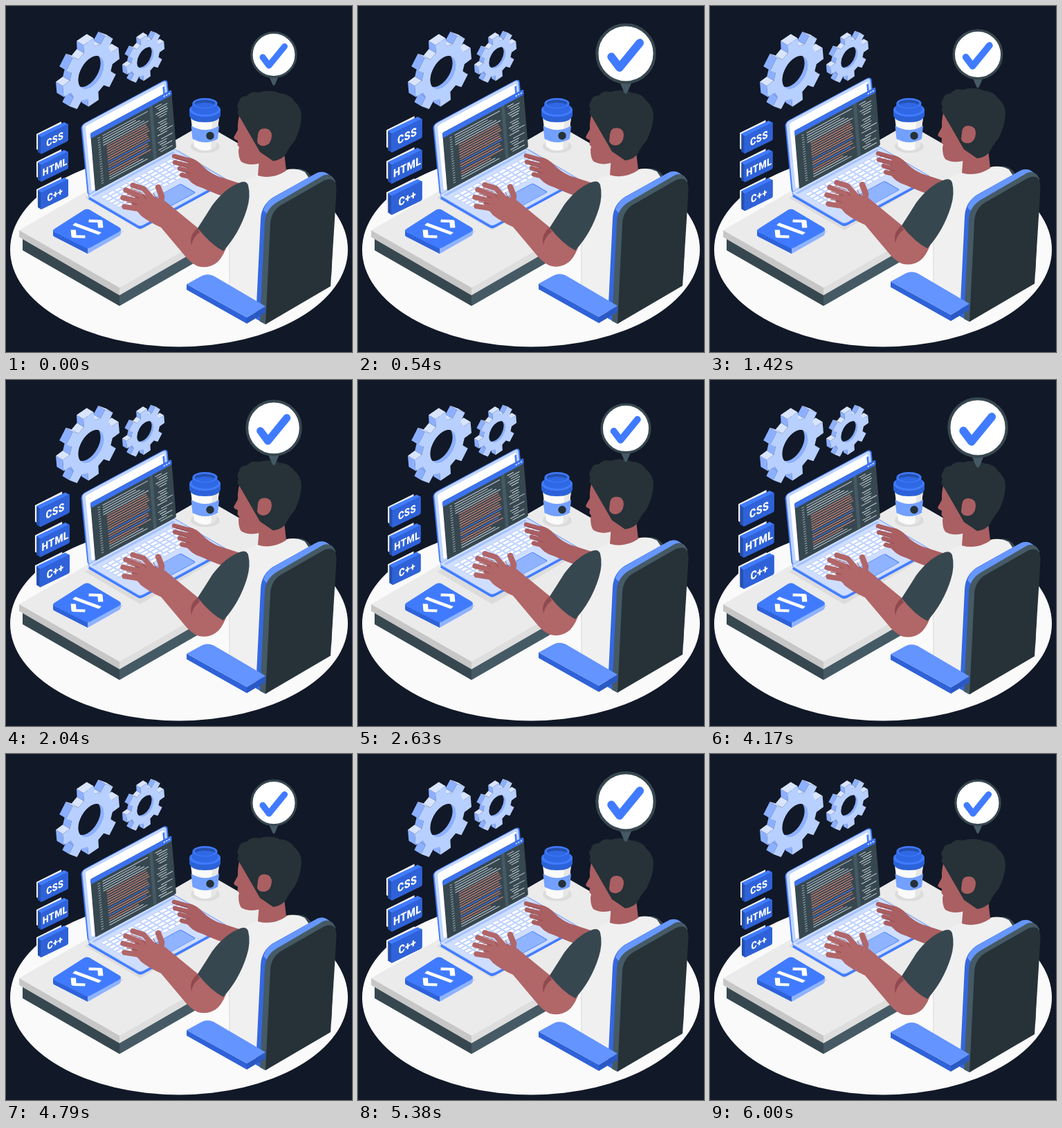
Recreate the animation shown at these times as an HTML page. Size 500 px wide and 500 px high, loop 6.04 s.

```html
<!DOCTYPE html>
<html lang="en">
<head>
<meta charset="utf-8">
<title>Developer at work</title>
<style>
html, body { margin: 0; width: 100%; height: 100%; overflow: hidden; background: #111827; }
svg { display: block; width: 100vw; height: 100vh; }
text { font: 800 14.5px Roboto, Inter, sans-serif; fill: #fff; text-anchor: middle; letter-spacing: .4px; }
</style>
</head>
<body>
<svg id="stage" viewBox="0 0 500 500" xmlns="http://www.w3.org/2000/svg">
  <ellipse cx="250" cy="352" rx="244" ry="140.500" fill="#fafafa"/>

  <g id="gears"></g>

  <g id="desk">
    <path d="M24 336 164 416V433.500L24 353Z" fill="#37474f"/>
    <path d="M164 416 284 347V364.500L164 433.500Z" fill="#455a64"/>
    <path d="M19 324 286 170 430 253 164 407Z" fill="#ebebeb"/>
    <path d="M19 324 164 407V418L19 334Z" fill="#c7c7c7"/>
    <path d="M164 407 430 253V264L164 418Z" fill="#dedede"/>
    <path d="M114 277 194 324 320 250 250 208Z" fill="#dcdcdc"/>
    <ellipse cx="288" cy="203" rx="21" ry="9.500" fill="#dcdcdc"/>
  </g>

  <g id="tile">
    <path d="M70 331 116 304 170 326 120 357Z" fill="#d9d9d9"/>
    <path d="M68 324V331Q68 333 71 334L118 358V349Z" fill="#2e62d9"/>
    <path d="M118 349V358L164 332Q166 330 166 328V322Z" fill="#8fb3ff"/>
    <path d="M70 322 113 294.500Q117 292.500 121 294.500L164 320Q168 323 164 326L122 349Q118 351 114 349L70 327Q66 324.500 70 322Z" fill="#407bff"/>
    <g transform="matrix(.86 -.5 .86 .5 117 322)" fill="none" stroke="#fff" stroke-width="6" stroke-linejoin="round">
      <path d="M-13-10-22 0-13 10M13-10 22 0 13 10M-4-18 4 18"/>
    </g>
  </g>

  <g id="cup">
    <path d="M267 160 272 203Q288 215 303 203L308 160Z" fill="#fafafa"/>
    <path d="M298 165 296 208 303 203 308 160Z" fill="#e6e6e6"/>
    <path d="M267.500 173Q288 185 308 173L306 192Q288 202 269.500 192Z" fill="#73a0ff"/>
    <circle cx="295" cy="187.500" r="5.700" fill="#263238"/>
    <path d="M265 150V158Q267 168 287.500 168 308 168 310 158V150Z" fill="#2c62d8"/>
    <ellipse cx="287.500" cy="150" rx="22.500" ry="10" fill="#407bff"/>
    <path d="M269.500 141 268 150Q274 157 287.500 157 302 157 307 150L305 141Z" fill="#2f68e5"/>
    <ellipse cx="287.500" cy="140.500" rx="18" ry="7.500" fill="#407bff"/>
    <ellipse cx="287.500" cy="141" rx="15" ry="5.500" fill="#2450ae"/>
    <path d="M273 142Q287 137 302 142 299 147 287 147 277 147 273 142Z" fill="#2f68e5"/>
  </g>

  <g id="worker">
    <g id="laptop"></g>

    <g id="farArm" fill="#aa5f62" stroke-linecap="round">
      <path d="M264 219Q275 221 284 231 294 241 306 246L340 257 326 279Q303 272 284 263 266 258 259 244Z"/>
      <path d="M243 217 268 224M244 226 264 231M251 235 265 239M254 244 270 248" fill="none" stroke="#aa5f62" stroke-width="6.500"/>
      <path d="M246 220 263 225M249 230 263 234M256 239 267 242" fill="none" stroke="#8f4a50" stroke-width=".8"/>
    </g>

    <g id="body">
      <path d="M416 237Q430 231 441 246L433 258Z" fill="#37474f"/>
      <path d="M344 254Q354 247 364 244 384 249 404 237 419 233 432 240L452 270 375 440 323 405 322 340Z" fill="#f0f0f0"/>
      <path d="M323 345V405" stroke="#d5d5d5" stroke-width=".8"/>
    </g>

    <g id="head" fill="#aa5f62">
      <path d="M366 218 364 245Q385 251 405 238L402 212Z"/>
      <path d="M340 148Q334 166 335 179L329.500 189Q328 192 335 194.500L334.500 201 337 204 336 208Q336 220 340 225 351 232 368 227L386 212 380 160Z"/>
      <path d="M337 159Q333 156 336 149 332 144 337 138 338 130 348 130 355 122 365 125 382 120 395 126 410 127 416 137 427 146 427 160 426 178 417 195 408 206 405 213 400 222 386 224 376 217 367 211 369 197L364 177Q359 175 356 170 350 172 348 164 342 166 340 160Z" fill="#263238"/>
      <path d="M364 186Q365 176 375 177 384 178 384 188 383 200 374 202 365 203 363 196Z"/>
    </g>

    <g id="nearArm">
      <path d="M230 282 280 323 318 350Q311 367 303 372 291 380 277 376 266 371 256 358L224 320Q208 313 195 303L181 286 190 270 216 276Z" fill="#b16668"/>
      <g fill="none" stroke="#b16668" stroke-width="7.500" stroke-linecap="round" stroke-linejoin="round">
        <path d="M183 259 199 264 214 281M173 266 193 274 205 288M169 277 190 282 204 292M171 290 190 293 204 300"/>
        <path d="M220 262 225 275 223 292" stroke-width="8.500"/>
      </g>
      <path d="M181 264 196 270 203 279M175 272 193 278M174 283 190 287M213 270 217 278" fill="none" stroke="#8f4a50" stroke-width=".9"/>
      <path d="M277 321Q264 331 268 346 270 334 280 327Z" fill="#8f4a50"/>
      <path d="M336 256Q347 251 350 259 354 275 348 294 337 329 314 354 296 345 277 321 288 304 298 288 316 264 336 256Z" fill="#37474f"/>
    </g>

    <g id="chair">
      <path d="M361 452 368 308Q369 288 385 277L446 243Q457 236 467 244L474 250 470 390 375 460Z" fill="#3568df"/>
      <path d="M372 295Q376 282 386 277L446 243Q457 236 467 244L461 248 394 286Q383 292 380 303Z" fill="#6697ff"/>
      <path d="M367 456 374 312Q375 294 391 284L453 248Q464 240 472 247L476 253 470 390 375 460Z" fill="#455a64"/>
      <path d="M375 460 382 315Q383 297 397 288L460 252Q478 245 477.500 267L469 405Z" fill="#263238"/>
      <path d="M261 402 348 450V459L261 410Z" fill="#2f62d8"/>
      <path d="M348 450 375 434V443L348 459Z" fill="#2b59c4"/>
      <path d="M261 402 283 390Q291 386 300 390L375 434 348 450Z" fill="#6394ff"/>
    </g>
  </g>

  <g id="badges"></g>

  <g id="bubble">
    <path d="M379 99H395L389 113Q387 117 385 113Z" fill="#455a64"/>
    <circle cx="387" cy="70.500" r="32" fill="#fff" stroke="#37474f" stroke-width="3.200"/>
    <path d="M371 74 380 86 402.500 58.500" fill="none" stroke="#407bff" stroke-width="9" stroke-linecap="round" stroke-linejoin="round"/>
  </g>
</svg>
<script>
const LOOP = 6040;
const el = id => document.getElementById(id);
const rect = (x, y, w, h, fill, extra = '') =>
  `<rect x="${x}" y="${y}" width="${w}" height="${h}" fill="${fill}" ${extra}/>`;
const poly = (pts, fill) =>
  `<polygon points="${pts.map(p => p.map(n => n.toFixed(1)).join()).join(' ')}" fill="${fill}"/>`;

// Gear standing in the isometric plane, extruded up and to the left.
function gear(id, cx, cy, outer, root, hole, dx, dy) {
  const pts = [];
  for (let i = 0; i < 8; i++) {
    const mid = i * Math.PI / 4 - 0.09;
    for (const [r, a] of [[root, -.25], [outer, -.18], [outer, .18], [root, .25]]) {
      const x = r * Math.cos(mid + a), y = r * Math.sin(mid + a);
      pts.push([cx + .866 * x, cy - .5 * x + y]);
    }
  }
  const shift = p => [p[0] + dx, p[1] + dy];
  let out = '';
  pts.forEach((p, i) => {
    const q = pts[(i + 1) % pts.length];
    const nx = q[1] - p[1], ny = p[0] - q[0];
    if (nx * dx + ny * dy <= 0) return;
    out += poly([p, q, shift(q), shift(p)], ny < -Math.abs(nx) * .8 ? '#d9e5ff' : '#8cb0ff');
  });
  const iso = `matrix(.866 -.5 0 1 ${cx} ${cy})`;
  out += poly(pts, '#b8d0ff');
  out += `<clipPath id="${id}"><circle r="${hole}" transform="${iso}"/></clipPath>`;
  out += `<g clip-path="url(#${id})"><circle r="${hole}" transform="${iso}" fill="#8cb0ff"/>` +
    `<circle r="${hole}" transform="translate(${dx * .5} ${dy * .5}) ${iso}" fill="#111827"/></g>`;
  return out;
}

function codeWindow() {
  let out = rect(0, 0, 100, 100, '#37474f', 'rx="2"') + rect(72, 8, 4, 92, '#455a64') +
    rect(0, 0, 100, 9, '#3b72ee', 'rx="2"');
  for (let i = 0; i < 3; i++) out += `<circle cx="${91 + i * 3}" cy="4.500" r="1" fill="#fff"/>`;
  const blue = [12, 15];
  for (let i = 0; i < 20; i++) {
    const y = 14 + i * 4.1;
    const color = i < 5 || i > 17 ? '#b9c3cc' : blue.includes(i) ? '#407bff' : '#d98578';
    const start = i < 5 ? 14 : 18;
    out += rect(8, y, 3, 1.3, '#9aa8b2');
    out += rect(start, y, 70 - start - (i * 7 % 4) * (i < 5 || i > 14 ? 5 : 1), 1.4, color);
    if (i % 7 !== 6) out += rect(79 + i % 3 * 2, y, 8 + i * 5 % 8, 1.3, '#c4ced4');
  }
  return out;
}

function laptop() {
  const lid = rect(0, 0, 100, 100, '#407bff', 'rx="5"') + rect(1.5, 1, 97, 99, '#c3d6ff', 'rx="4"') +
    rect(5, 5, 91, 91, '#fff', 'rx="2"') + rect(94, 8, 2, 15, '#407bff');
  let base = rect(0, 0, 100, 100, '#cfdeff', 'rx="4" stroke="#6f9cff" stroke-width=".8"') +
    rect(3, 4, 94, 4, '#a4c2ff');
  for (let row = 0; row < 6; row++) {
    const y = 15 + row * 7;
    for (let x = 7; x < 91;) {
      const w = row === 5 && x > 25 && x < 35 ? 25 : 5 + (row * 3 + x) % 3;
      base += rect(x, y, Math.min(w, 93 - x), 5.6, '#fff', 'rx=".8" stroke="#8eb2ff" stroke-width=".4"');
      x += w + 1;
    }
  }
  base += rect(36, 65, 32, 28, '#8fb3ff', 'rx="2" stroke="#407bff" stroke-width=".8"');
  const basePlane = y => `matrix(1.25 -.68 .77 .45 117 ${y})`;
  return `<g transform="${basePlane(278)}">${rect(0, 0, 100, 100, '#407bff', 'rx="4"')}</g>` +
    `<g transform="matrix(1.25 -.67 .1 1.03 108 172)">${lid}</g>` +
    `<g transform="${basePlane(274)}">${base}</g>` +
    `<g transform="matrix(1.17 -.63 .07 .84 122 184)">${codeWindow()}</g>`;
}

function badge(label, i) {
  return `<g transform="translate(0 ${i * 40})">
    <path d="M44 185 80 167V171L48 188V209L44 207Z" fill="#f2f2f2"/>
    <path d="M46 186 84 168 90 171 50 191Z" fill="#407bff"/>
    <path d="M46 186 51 190V214L46 211Z" fill="#2450ae"/>
    <path d="M52 189 88 171Q90 170 90 172V193Q90 195 88 196L53 213Q50 215 50 212V192Q50 190 52 189Z" fill="#2f62d8"/>
    <text transform="matrix(.87 -.43 0 1 70.800 197.500)">${label}</text></g>`;
}

el('gears').innerHTML = gear('bigHole', 123, 96, 47.5, 36, 21.5, -10, -6) +
  gear('smallHole', 201.5, 75, 32, 24, 14, -6, -3.5);
el('laptop').innerHTML = laptop();
el('badges').innerHTML = ['CSS', 'HTML', 'C++'].map(badge).join('');

const swing = (t, cycles) => (1 - Math.cos(2 * Math.PI * cycles * t / LOOP)) / 2;
const lift = (id, dy) => el(id).setAttribute('transform', `translate(0 ${-dy})`);
const zoom = (id, x, y, s) =>
  el(id).setAttribute('transform', `translate(${x} ${y}) scale(${s}) translate(${-x} ${-y})`);

function draw(now) {
  const t = now % LOOP, pulse = swing(t, 5);
  lift('worker', 8.5 * swing(t, 1));
  zoom('badges', 67.5, 231, 1 + .13 * pulse);
  zoom('bubble', 387, 76, 1 + .31 * pulse);
  requestAnimationFrame(draw);
}
draw(performance.now());
</script>
</body>
</html>
```
